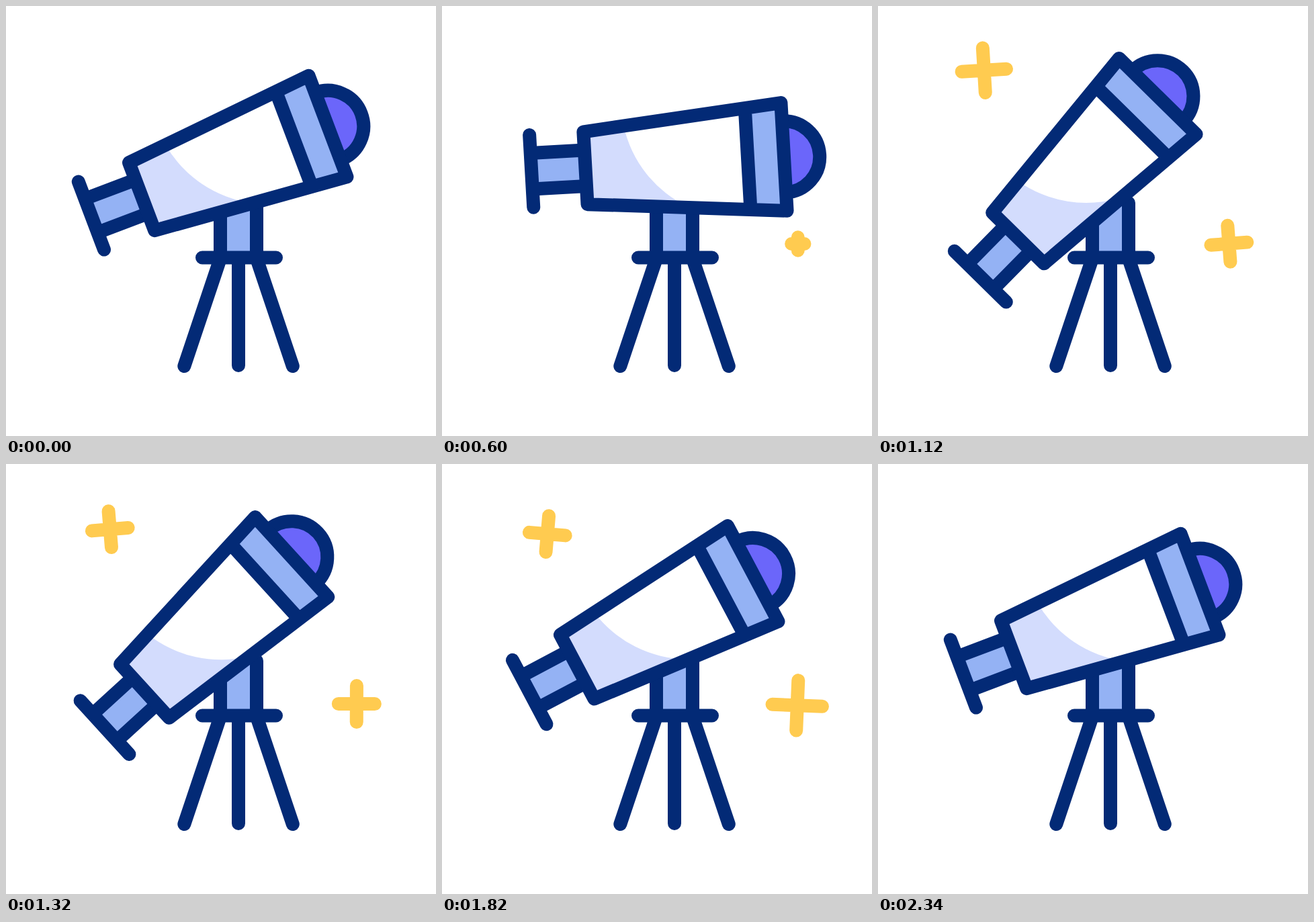
Write an HTML page that moves like this. It is 640 px wide and 640 px high and loops after 2.4 s.

```html
<!DOCTYPE html>
<html lang="en">
<head>
<meta charset="utf-8">
<title>Telescope</title>
<style>
  html, body { margin: 0; width: 100%; height: 100%; overflow: hidden; background: #fff; }
  svg { display: block; width: 100%; height: 100%; }
  .line { fill: none; stroke: #032a76; stroke-width: 20; stroke-linecap: round; stroke-linejoin: round; }
  .sky { fill: #94b2f4; }
  .star { fill: none; stroke: #ffcb50; stroke-width: 20; stroke-linecap: round; }
</style>
</head>
<body>
<svg viewBox="0 0 640 640">
  <path class="sky" d="M319 293H373V375H319Z"/>
  <path class="line" d="M319 375V293M373 375V293"/>
  <path class="line" d="M292 374.5H402M319.3 375L265.3 536M346 375V535M372.7 375L426.8 536"/>

  <g id="tube">
    <path fill="#6b66fa" d="M513 180.6A53.2 53.2 0 0 1 513 287Z"/>
    <path class="line" d="M513 180.6A53.2 53.2 0 0 1 513 287"/>
    <path class="sky" d="M136.6 207H217V260.6H136.6Z"/>
    <path class="line" d="M136.6 207H217M136.6 260.6H217M136.6 179.8V287.8"/>
    <path fill="#fff" d="M217 179.8L513 153.3V314.3L217 287.8Z"/>
    <path fill="#d3dcfd" d="M217 179.8L277.3 174A175 175 0 0 0 367 300.5L217 287.8Z"/>
    <path class="sky" d="M459 158.2L513 153.3V314.3L459 309.4Z"/>
    <path class="line" d="M459 158.2V309.4M217 179.8L513 153.3V314.3L217 287.8Z"/>
  </g>

  <path class="star" id="starA"/>
  <path class="star" id="starB"/>
</svg>
<script>
  const LOOP = 2400;
  const TURN = 2 * Math.PI;
  const REST = -20.7, LOW = 4, HIGH = -45.8;

  // Star timing in ms, arm lengths in px
  const LIFE = 1560, GROW = 260, SETTLE = 200;
  const ARM = 27, EXTRA = 11;

  const tube = document.getElementById("tube");
  const stars = [
    { el: document.getElementById("starA"), x: 158, y: 100, start: 775 },
    { el: document.getElementById("starB"), x: 526, y: 356, start: 535 }
  ];

  const clamp = p => Math.min(1, Math.max(0, p));
  const smooth = p => p * p * (3 - 2 * p);
  const ramp = (t, from, to) => smooth(clamp((t - from) / (to - from)));

  // Dip down, swing up, ease back to rest.
  const tilt = t => REST
    + (LOW - REST) * ramp(t, 0, 462)
    + (HIGH - LOW) * ramp(t, 462, 1040)
    + (REST - HIGH) * ramp(t, 1040, 2250);

  // Arms shoot out past full length and settle; the exit mirrors the entry.
  function armLength(age) {
    const m = Math.min(age, LIFE - age);
    return m < GROW
      ? (ARM + EXTRA) * m / GROW
      : ARM + EXTRA * clamp(1 - (m - GROW) / SETTLE);
  }

  // Each star makes one small orbit while rocking left, then right.
  function drawStar({ el, x, y, start }, t) {
    const age = t - start;
    const alive = age >= 0 && age < LIFE;
    el.style.display = alive ? "" : "none";
    if (!alive) return;
    const u = age / LIFE;
    const arm = armLength(age);
    const orbit = TURN * (u + 0.035);
    const cx = x + 4.3 * Math.cos(orbit);
    const cy = y - 4.3 * Math.sin(orbit);
    const rock = -4.8 * Math.sin(TURN * smooth(u));
    el.setAttribute("d", `M${-arm} 0H${arm}M0 ${-arm}V${arm}`);
    el.setAttribute("transform", `translate(${cx} ${cy}) rotate(${rock})`);
  }

  function draw(now) {
    const t = now % LOOP;
    tube.setAttribute("transform", `rotate(${tilt(t)} 346 299.5)`);
    stars.forEach(s => drawStar(s, t));
  }

  const begin = performance.now();
  function tick() {
    draw(performance.now() - begin);
    requestAnimationFrame(tick);
  }
  tick();
</script>
</body>
</html>
```
